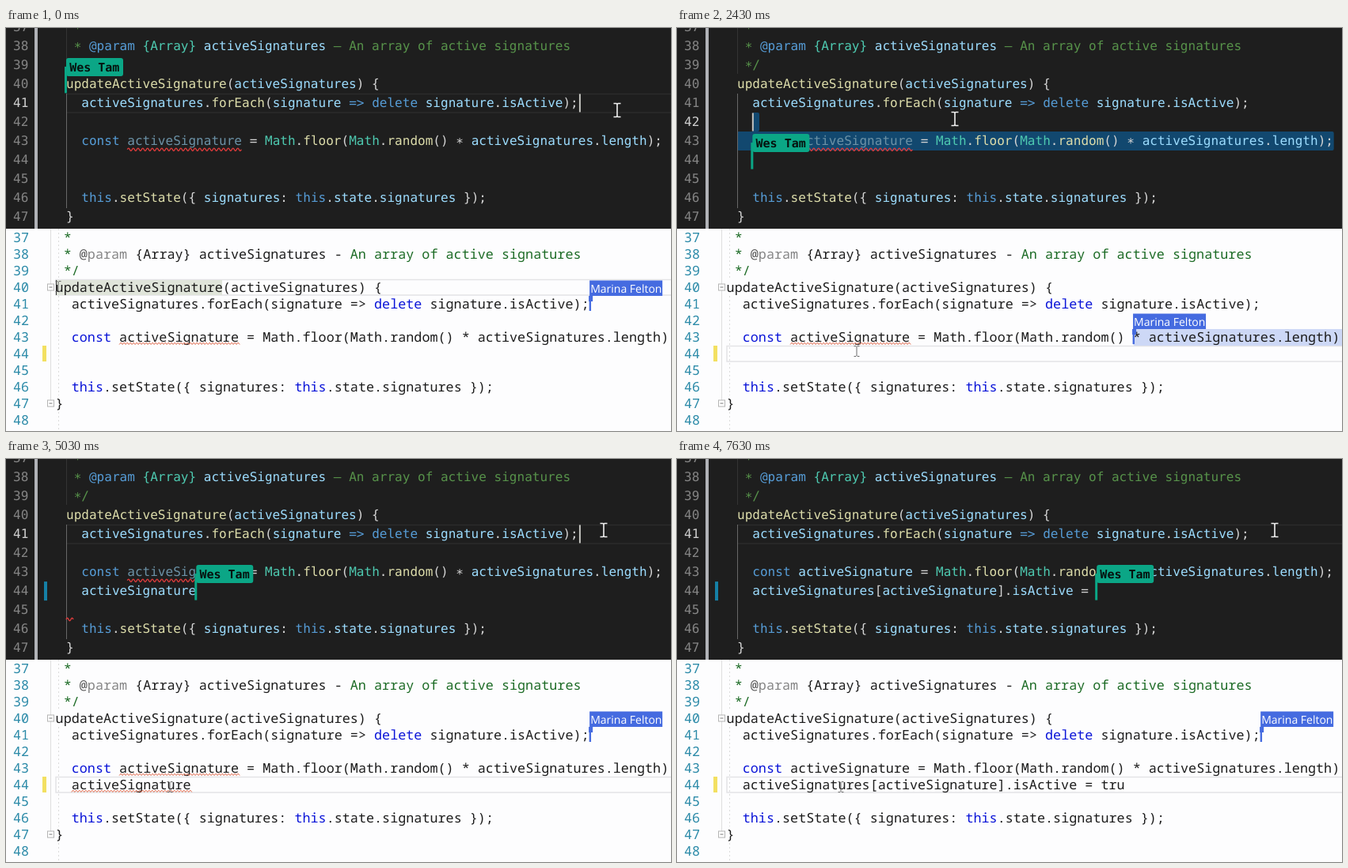
Animation, 840 px wide and 510 px high, one loop 8000 ms. Source, as an HTML page:

```html
<!DOCTYPE html>
<html lang="en">
<head>
<meta charset="utf-8">
<title>Shared editing session</title>
<style>
  html, body { margin: 0; width: 840px; height: 510px; overflow: hidden; background: #fdfdfe; }
  svg { display: block; }
  text { white-space: pre; text-rendering: geometricPrecision; }
  .dark { font: 16.05px "DejaVu Sans Mono", monospace; fill: #d4d4d4; }
  .light { font: 500 16.78px "Noto Sans Mono", monospace; fill: #1c1c1c; }
  .flag { font: bold 15px "DejaVu Sans Mono", monospace; fill: #06110e; }
  .label { font: 14px "Open Sans", sans-serif; fill: #fff; }
  .item { font: 9.7px "Open Sans", sans-serif; fill: #222; }
  .icon { font: bold 7px "Open Sans", sans-serif; fill: #444; }
</style>
</head>
<body>
<svg id="stage" width="840" height="510" viewBox="0 0 840 510"></svg>
<script>
const LOOP = 8000, LAG = 200;
const HOST = 'Wes Tam', GUEST = 'Marina Felton';
const TYPED = 'activeSignatures[activeSignature].isActive = true';

const CODE = {
  40: 'updateActiveSignature(activeSignatures) {',
  41: '  activeSignatures.forEach(signature => delete signature.isActive);',
  42: '  ',
  43: '  const activeSignature = Math.floor(Math.random() * activeSignatures.length);',
  44: '  ',
  45: '',
  46: '  this.setState({ signatures: this.state.signatures });',
  47: '}'
};
const END41 = CODE[41].length, END43 = CODE[43].length, END46 = CODE[46].length;

// Geometry of the two editors
const dark = { x: c => 76 + c * 9.663, top: n => 58.9 + (n - 40) * 24.05, h: 24.05, base: 17 };
const light = { x: c => 62.6 + c * 10.068, top: n => 318 + (n - 40) * 21, h: 21, base: 15.7 };

const rect = (x, y, w, h, fill, more = '') =>
  `<rect x="${x}" y="${y}" width="${w}" height="${h}" fill="${fill}" ${more}/>`;
const path = (d, stroke, width = 1, more = '') =>
  `<path d="${d}" fill="none" stroke="${stroke}" stroke-width="${width}" ${more}/>`;
const text = (cls, x, y, s, more = '') => `<text class="${cls}" x="${x}" y="${y}" ${more}>${s}</text>`;
const span = (fill, s) => `<tspan fill="${fill}">${s}</tspan>`;
const line = (ed, cls, n, s) => text(cls, ed.x(0), ed.top(n) + ed.base, s);

// The dark editor sets its asterisks lower, in the middle of the line
const lowStar = s => s.replace('*', '<tspan dy="2.5">*</tspan><tspan dy="-2.5">') + (s.includes('*') ? '</tspan>' : '');

const paint = (s, color) => s.replace(/=>|[A-Za-z]+(?=(\()?)/g, (w, call) => span(color(w, call), w));
const darkColor = faded => (w, call) =>
  /^(const|delete|this|true|=>)$/.test(w) ? '#569cd6' :
  w === 'Math' ? '#4ec9b0' :
  call ? '#dcdcaa' :
  faded && w === 'activeSignature' ? '#6b91a6' : '#9cdcfe';
const lightColor = w => /^(const|delete|this|true)$/.test(w) ? '#0a14d8' : '#1c1c1c';

const wave = (x, y, w) =>
  path(`M${x} ${y}q1.5 -3.4 3 0` + 't3 0'.repeat(Math.round(w / 3) - 1), '#e23c3c', 1.4);
const zigzag = (x, y, w) =>
  path(`M${x} ${y}` + 'l2 -2.4l2 2.4'.repeat(Math.round(w / 4)), '#e0694c', 1);
const beam = (x, y, h, w, color, width) =>
  path(`M${x - w} ${y - h}h${w - 1}l1 1l1 -1h${w - 1}M${x} ${y - h + 1}v${2 * h - 2}` +
       `M${x - w} ${y + h}h${w - 1}l1 -1l1 1h${w - 1}`, color, width);

// Piecewise linear track of [time, ...values]
function track(points, t) {
  const i = points.findIndex(p => p[0] > t);
  if (i < 0) return points[points.length - 1].slice(1);
  if (i === 0) return points[0].slice(1);
  const a = points[i - 1], b = points[i], k = (t - a[0]) / (b[0] - a[0]);
  return a.slice(1).map((v, j) => v + (b[j + 1] - v) * k);
}

const GUEST_MOUSE = [[1230, 772, 104], [1630, 815, 143], [1830, 815, 143], [2030, 740, 143],
  [2230, 567, 141], [2430, 351, 115], [2630, 351, 115], [3030, 755, 90]];
const HOST_MOUSE = [[30, 66, 327], [430, 661, 460], [1230, 661, 460], [1630, 227, 409],
  [3430, 227, 409], [3830, 207, 415]];
const KEYS = [[3500, 0], [4830, 15], [5030, 15], [6630, 35], [6830, 36], [7030, 42],
  [7430, 45], [7630, 48]];

const typedCount = t => Math.floor(track(KEYS, t)[0]);

function hostCaret(t) {
  if (t < 230) return [40, 0];
  if (t < 430) return [43, 28];
  if (t < 1630) return [46, END46];
  return [44, 2 + typedCount(t)];
}

function guestCaret(t) {
  if (t < 1630 || t >= 3030) return [41, END41];
  if (t >= 2430) return [42, 2];
  if (t < 2030) return [43, END43];
  return [43, t < 2230 ? 69 : 51];
}
const guestSelects = t => t >= 1830 && t < 3030;

// Selection running back from the end of line 43 to the guest's caret
function backSelection(ed, [n, c], fill) {
  const bar = (row, from, to) =>
    rect(ed.x(from), ed.top(row), ed.x(to) - ed.x(from), ed.h, fill, 'rx="2"');
  return n === 42 ? bar(42, 2, 2.9) + bar(43, 0, END43) : bar(43, c, END43);
}

function darkEditor(t) {
  const n = typedCount(t - LAG), caret = guestCaret(t), unused = n < 33;
  const [hl, hc] = hostCaret(t - LAG);
  const row = dark.top(caret[0]);
  let s = rect(0, 0, 840, 254, '#1e1e1e');

  if (guestSelects(t)) s += backSelection(dark, caret, '#12486f');
  else s += path(`M77 ${row + 0.5}H840M77 ${row + 24}H840`, '#2b2b2b', 1.5);
  s += path('M76.5 0V58', '#333') + path('M76.5 83V228', '#686868');
  s += rect(36, 0, 4, 254, '#b0b2b7');

  for (let i = 37; i < 48; i++)
    s += text('dark', 9, dark.top(i) + dark.base, i, `style="fill:${i === caret[0] ? '#d0d0d0' : '#858585'}"`);

  const green = '#57924a';
  s += line(dark, 'dark', 37, span(green, lowStar(' *')));
  s += line(dark, 'dark', 38, lowStar(span(green, ' * ') + span('#569cd6', '@param ') + span('#4ec9b0', '{Array} ') +
    span('#9cdcfe', 'activeSignatures') + span(green, ' – An array of active signatures')).replace('"> </tspan>', '"> </tspan>'));
  s += line(dark, 'dark', 39, span(green, lowStar(' */')));
  for (let i = 40; i < 48; i++) {
    const code = CODE[i] + (i === 44 ? TYPED.slice(0, n) : '');
    s += line(dark, 'dark', i, lowStar(paint(code, darkColor(i === 43 && unused))));
  }

  if (unused) s += wave(dark.x(8), 153.8, 144);
  if (n >= 15 && n < 17) s += wave(76, 203, 9);
  if (n > 0) s += rect(48, dark.top(44), 4, 24, '#1580a6');

  const phase = t < 1630 ? (t + 480) / 530 : (t - 3130) / 460;
  if (guestSelects(t) || Math.floor(phase) % 2 === 0)
    s += rect(dark.x(caret[1]) + (caret[0] === 41 ? 0.5 : -0.5), row + 0.5, 2, 23, '#c4c4c0');

  const fx = dark.x(hc), fy = dark.top(hl);
  s += rect(fx - 2, fy - 10, 3, 33.5, '#0ba686');
  s += rect(fx, fy - 21, 72, 23, '#0ba686', 'rx="3"');
  s += text('flag', fx + 4.2, fy - 4, HOST);

  const [mx, my] = track(GUEST_MOUSE, t);
  return s + beam(mx, my, 8.5, 4.5, '#f2f2f2', 1.6);
}

function popup(x, items, pick) {
  let s = rect(x + 0.5, 425.5, 164, 90, '#fdfdfd', 'stroke="#cccedb"');
  s += rect(x + 150, 426, 14, 90, '#e8e8ec') + rect(x + 153, 485, 8, 30, '#c2c3c9');
  s += `<path d="M${x + 153} 435.5l4 -5l4 5z" fill="#868999"/>`;
  items.forEach((name, i) => {
    const y = 433 + i * 16;
    if (i === pick) s += rect(x + 18, y - 7, 132, 15, '#f9e795');
    s += text('icon', x + 4, y + 2.5, 'C#') + text('item', x + 19, y + 4, name);
  });
  return s;
}

function lightEditor(t) {
  const n = typedCount(t), [hl, hc] = hostCaret(t), guest = guestCaret(t - LAG);
  const selecting = t >= 230 && t < 1630;
  let s = rect(0, 254, 840, 256, '#fdfdfe');

  s += path('M56.5 254V475', '#dedede');
  s += path('M66.5 254V318M66.5 339V465M66.5 486V510', '#dcdcdc', 1, 'stroke-dasharray="2 3"');
  for (const y of [328, 475])
    s += rect(52.5, y - 4, 8, 8, '#fff', 'stroke="#b4b4b4"') + path(`M54.5 ${y}h4`, '#777');
  s += rect(46, 402, 5, 20, '#f3e061');

  if (selecting) {
    for (let i = 40; i <= hl; i++) {
      const end = i < hl ? CODE[i].length + 1 : hc;
      s += rect(light.x(0), light.top(i), light.x(end) - light.x(0), light.h, '#94c5ef');
    }
  } else {
    s += rect(63, light.top(hl) + 0.5, 790, 19.5, 'none', 'stroke="#e4e4e6" stroke-width="1.5"');
  }
  if (t < 230) s += rect(63, 319, 210, 19, '#e0e5da');
  if (guestSelects(t - LAG)) s += backSelection(light, guest, '#cdd8f6');

  for (let i = 37; i < 49; i++)
    s += text('light', 9, light.top(i) + light.base, i, 'style="fill:#2b8aa8"');

  const green = '#1c6b25';
  s += line(light, 'light', 37, span(green, ' *'));
  s += line(light, 'light', 38, span(green, ' * ') + span('#555', '@') + span('#858585', 'param') +
    ' {Array} activeSignatures - ' + span(green, 'An array of active signatures'));
  s += line(light, 'light', 39, span(green, ' */'));
  for (let i = 40; i < 48; i++) {
    const code = i === 43 ? CODE[i].slice(0, -1) : CODE[i] + (i === 44 ? TYPED.slice(0, n) : '');
    s += line(light, 'light', i, paint(code, lightColor));
  }

  if (n < 33) s += zigzag(light.x(8), 400.5, 150);
  if (n === 15) s += zigzag(light.x(2), 421.5, 150);

  const blink = Math.floor((t - 2430) / 530) % 2 !== 0;
  if (t < 1630 || (n === 0 && blink))
    s += rect(Math.round(light.x(hc)), light.top(hl) + 1, 1, 19, '#333');

  const gx = light.x(guest[1]), gy = light.top(guest[0]), blue = '#456be0';
  s += rect(gx - 1, gy, 5, 7, blue) + rect(gx - 0.5, gy, 2.4, 19, blue);
  s += rect(gx, gy - 19.5, 92, 19.5, blue) + text('label', gx + 1, gy - 4.5, GUEST);

  if (n >= 18 && n < 30)
    s += popup(253, ['accept', 'action', 'active', 'activeSignature', 'activeSignatures', 'add'], 3);
  if (n === 35 || n === 36)
    s += popup(425, ['GridLegend', 'GuestbookGrid', 'GuestbookGridCell', 'index', 'isActive', 'keys'], 3);

  const [mx, my] = track(HOST_MOUSE, t);
  return s + beam(mx, my, 6.5, 3.5, '#6a6a6a', 1);
}

const stage = document.getElementById('stage');
const start = performance.now();
let shown = -1;

function tick() {
  const t = (performance.now() - start) % LOOP;
  // The picture refreshes five times a second
  const now = t < 30 ? 0 : Math.min(7630, 30 + Math.floor((t - 30) / 200) * 200);
  if (now !== shown) {
    shown = now;
    stage.innerHTML = lightEditor(now) + darkEditor(now);
  }
  requestAnimationFrame(tick);
}
tick();
</script>
</body>
</html>
```
